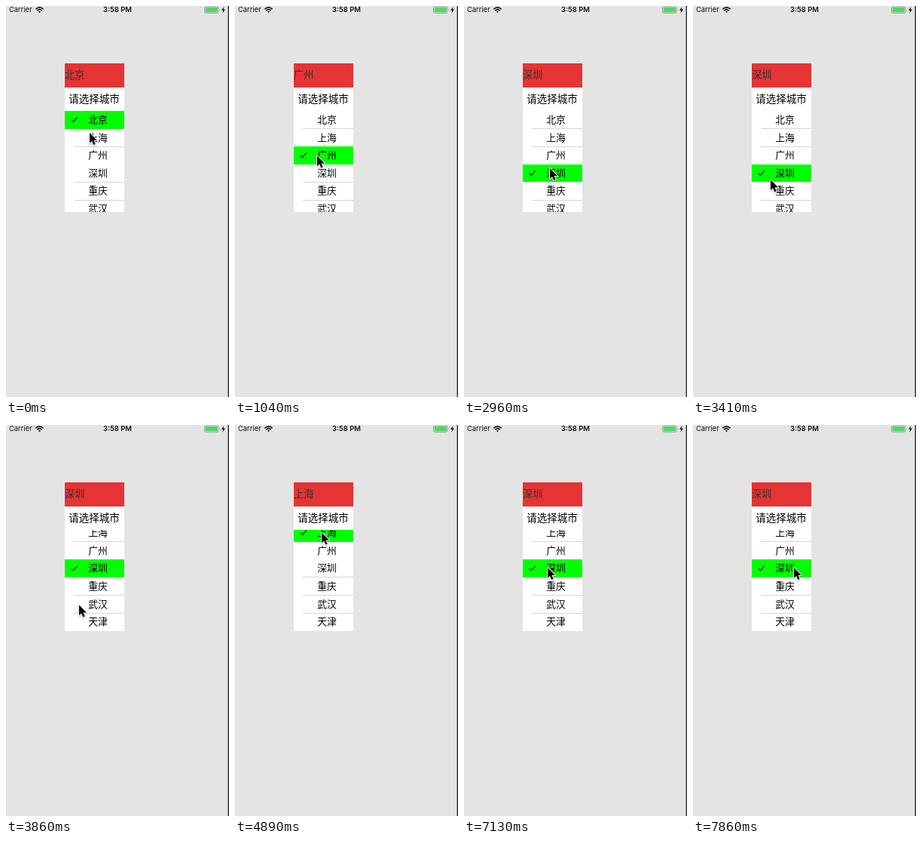
Recreate the animation shown at these times as an HTML page. Size 296 px wide and 518 px high, loop 8 s.

```html
<!DOCTYPE html>
<html lang="zh-CN">
<head>
<meta charset="utf-8">
<title>City picker</title>
<style>
  html, body { margin: 0; width: 100%; height: 100%; overflow: hidden; background: #e4e4e4; }
  svg { display: block; width: 296px; height: 518px; }
  rect { shape-rendering: crispEdges; }
  text { font-family: "Noto Sans CJK SC", "Noto Sans CJK", sans-serif; font-size: 12.8px; font-weight: 350; }
  .status { font-family: Inter, Roboto, sans-serif; font-size: 9.4px; font-weight: 400; fill: #111; }
  .clock { font-weight: 600; }
  #cursor { filter: drop-shadow(0 1px 1px rgba(0, 0, 0, .3)); }
</style>
</head>
<body>
<svg viewBox="0 0 296 518">
  <defs><clipPath id="listArea"><rect x="78" y="139" width="79" height="134"/></clipPath></defs>
  <rect width="296" height="518" fill="#e4e4e4"/>
  <path d="M295.3 0V518" stroke="#2b2b2b" stroke-width="1.4"/>

  <text class="status" x="4" y="8.2">Carrier</text>
  <g fill="none" stroke="#111" stroke-width="1.6">
    <path d="M39.4 4.2Q44.5 -.6 49.6 4.2M41.3 6.2Q44.5 3.2 47.7 6.2"/>
    <path d="M44.5 9 42.9 7.4Q44.5 6.2 46.1 7.4Z" fill="#111" stroke="none"/>
  </g>
  <text class="status clock" x="148" y="8.2" text-anchor="middle">3:58 PM</text>
  <path d="M265.5 1H280q2 0 2 2V7.4q0 2-2 2H265.5q-2 0-2-2V3q0-2 2-2Z" fill="none" stroke="#8b8b8b" stroke-width=".8"/>
  <path d="M264.6 2.1H280.8V8.3H264.6Z" fill="#4cd964"/>
  <path d="M282.9 3.8q1.4 1.4 0 2.8z" fill="#8b8b8b"/>
  <path d="M289.4 1 286 5.7h2.2L287.4 9.4 291 4.6h-2.3z" fill="#111"/>

  <rect x="78" y="76" width="79" height="32" fill="#e53434"/>
  <text id="chosen" x="78" y="96" fill="#333" style="font-size:13.2px"></text>
  <rect x="78" y="108" width="79" height="165" fill="#fff"/>
  <text x="117" y="128" text-anchor="middle" style="font-size:13.5px">请选择城市</text>
  <g clip-path="url(#listArea)"><g id="list">
    <g id="highlight">
      <rect x="78" width="79" height="23.6" fill="#0f0"/>
      <path d="M86.7 11.7 89.4 14.4 94.9 8.3" fill="none" stroke="#0c400c" stroke-width="1.4"/>
    </g>
  </g></g>
  <path id="cursor" d="M1 1V14.8L4.1 11.9 6.3 17 8.7 16 6.5 11.1H11Z" stroke="#fff" stroke-width="1.9" stroke-linejoin="round" paint-order="stroke"/>
</svg>
<script>
const LOOP = 8000, TICK = 148;
const LIST_TOP = 139, ROW = 23.62, MAX_SCROLL = 31.5;
const SCROLL_END = 25;
const cities = ["北京", "上海", "广州", "深圳", "重庆", "武汉", "天津"];

// Where the pointer has arrived at a tick, and the row it taps there
const stops = [
  { tick: 0, x: 110, y: 167, row: 0 },
  { tick: 7, x: 108, y: 197.5, row: 2 },
  { tick: 12, x: 111, y: 150, row: 0 },
  { tick: 16, x: 112, y: 219 },
  { tick: 20, x: 113, y: 214, row: 3 },
  { tick: SCROLL_END, x: 96, y: 237.5 },
  { tick: 33, x: 114, y: 141.5, row: 1 },
  { tick: 41, x: 112, y: 178 },
  { tick: 44, x: 110, y: 188, row: 3 },
  { tick: 53, x: 133, y: 188 }
];
const taps = stops.filter(stop => stop.row !== undefined);

const byId = id => document.getElementById(id);
const list = byId("list");

function addShape(tag, attributes, content = "") {
  const node = document.createElementNS("http://www.w3.org/2000/svg", tag);
  for (const name in attributes) node.setAttribute(name, attributes[name]);
  node.textContent = content;
  return list.appendChild(node);
}

const separators = cities.map((city, i) => {
  const top = LIST_TOP + i * ROW;
  addShape("text", { x: 122, y: top + 16, "text-anchor": "middle" }, city);
  return addShape("rect", { x: 90, y: top - 0.6, width: 67, height: 1, fill: "#d6d6d8" });
});

// Eased progress of a motion that lasts some ticks and ends at a given one
function ease(tick, end, length) {
  const p = Math.max(0, Math.min(1, 1 - (end - tick) / length));
  return p * p * (3 - 2 * p);
}

function pointerAt(tick) {
  let { x, y } = stops[0];
  stops.slice(1).forEach((stop, i) => {
    const p = ease(tick, stop.tick, Math.min(5, stop.tick - stops[i].tick));
    x += (stop.x - x) * p;
    y += (stop.y - y) * p;
  });
  return `translate(${x} ${y})`;
}

function draw(t) {
  const tick = Math.floor(t / TICK);
  const tap = taps.findLastIndex(stop => stop.tick <= tick);
  const { row } = taps[tap];
  const previous = tap ? taps[tap - 1].row : 3;

  byId("cursor").setAttribute("transform", pointerAt(tick));
  byId("chosen").textContent = cities[row];
  byId("highlight").setAttribute("transform", `translate(0 ${LIST_TOP + row * ROW})`);
  list.setAttribute("transform", `translate(0 ${-MAX_SCROLL * ease(tick, SCROLL_END, 2)})`);
  // The line above the row just deselected stays hidden until the next tap
  separators.forEach((line, i) => {
    const hidden = [0, row, row + 1, previous].includes(i);
    line.setAttribute("visibility", hidden ? "hidden" : "visible");
  });
}

const origin = performance.now();
function frame() {
  draw((performance.now() - origin) % LOOP);
  requestAnimationFrame(frame);
}
frame();
</script>
</body>
</html>
```
